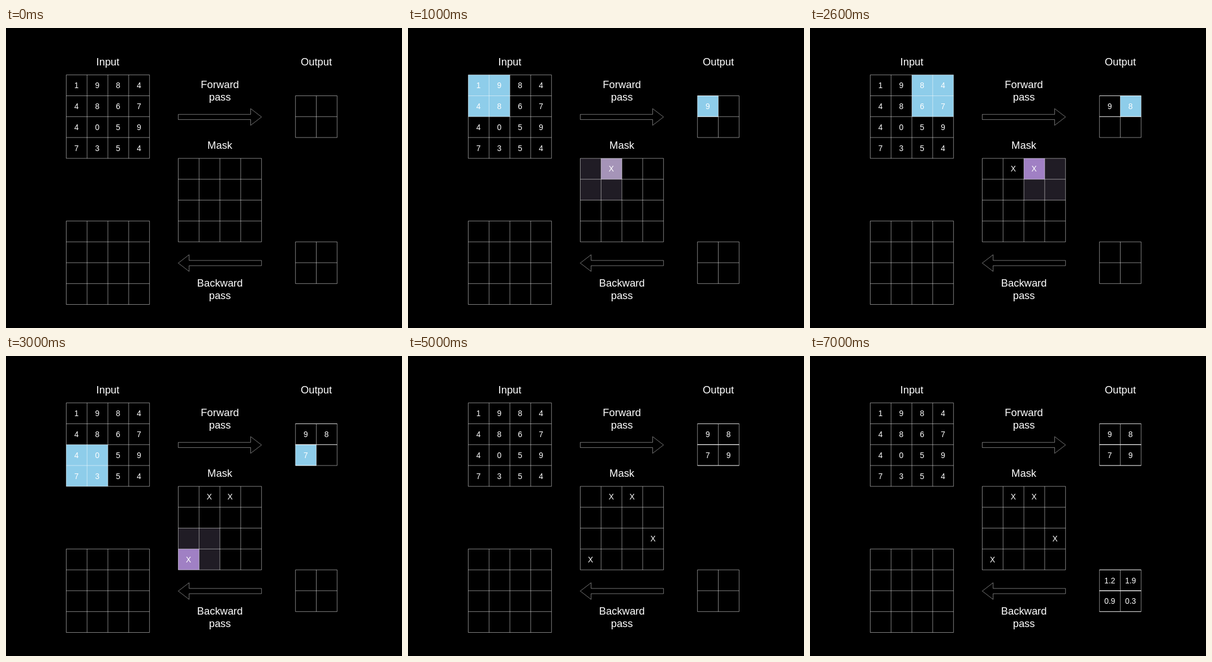
Animation, 700 px wide and 529 px high, one loop 8 s. Source, as an HTML page:

```html
<!DOCTYPE html>
<html lang="en">
<head>
<meta charset="utf-8">
<title>Max pooling: forward and backward pass</title>
<style>
  html, body { margin: 0; width: 100%; height: 100%; overflow: hidden; background: #000; }
  svg { display: block; width: 100%; height: 100%; }
  text { fill: #fff; text-anchor: middle; font-family: "Liberation Sans", Arial, sans-serif; }
  path { fill: none; stroke: #fff; stroke-width: .92; }
  .title { font-size: 18.4px; }
  .value { font-size: 13.8px; }
  .line { stroke-opacity: .56; }
  .edge { stroke-opacity: .8; }
  .arrow { stroke-opacity: .5; }
</style>
</head>
<body>
<svg viewBox="0 0 700 529"></svg>
<script>
const CELL = 36.8;
const LOOP = 8000;
const BLUE = '#8ecdea', DIM = '#201c25';
const svg = document.querySelector('svg');

const input  = { x: 106.5, y: 82.7,  n: 4 };
const mask   = { x: 304.5, y: 229.9, n: 4 };
const output = { x: 511.7, y: 119.5, n: 2 };
const gradIn = { x: 106.5, y: 340.3, n: 4 };
const gradOut = { x: 511.7, y: 377.1, n: 2 };

// One pooling window per step: picked mask cell, its colour and the value passed on.
const pools = [
  { col: 1, row: 0, value: 9, tint: '#a594b8' },
  { col: 2, row: 0, value: 8, tint: '#a080c4' },
  { col: 0, row: 3, value: 7, tint: '#a080c4' },
  { col: 3, row: 2, value: 9, tint: '#a080c4' }
];
const STEP = 1000, GRADIENT_AT = 7000;
const timed = [];

function add(parent, tag, attrs, text) {
  const el = document.createElementNS('http://www.w3.org/2000/svg', tag);
  for (const key in attrs) el.setAttribute(key, attrs[key]);
  if (text !== undefined) el.textContent = text;
  parent.append(el);
  return el;
}

function layer(from, to = LOOP) {
  const el = add(svg, 'g', {});
  timed.push({ el, from, to });
  return el;
}

function fill(parent, grid, col, row, color, span = 1) {
  add(parent, 'rect', {
    x: grid.x + col * CELL, y: grid.y + row * CELL,
    width: span * CELL, height: span * CELL, fill: color
  });
}

// Bright top and bottom edges of a filled-in cell.
function edges(parent, grid, col, row) {
  const x = grid.x + col * CELL, y = grid.y + row * CELL;
  add(parent, 'path', { d: `M${x} ${y}h${CELL}M${x} ${y + CELL}h${CELL}`, class: 'edge' });
}

function value(parent, grid, col, row, text) {
  add(parent, 'text', {
    x: grid.x + (col + .5) * CELL - .3, y: grid.y + (row + .5) * CELL + 5.1, class: 'value'
  }, text);
}

function lines(grid) {
  const { x, y, n } = grid, size = n * CELL;
  let d = '';
  for (let i = 0; i <= n; i++) {
    d += `M${x} ${y + i * CELL}h${size}M${x + i * CELL} ${y}v${size}`;
  }
  add(svg, 'path', { d, class: 'line' });
}

function title(x, y, ...rows) {
  rows.forEach((row, i) => add(svg, 'text', { x, y: y + i * 22.08, class: 'title' }, row));
}

// Arrow drawn from its tail; dir is 1 for right, -1 for left.
function arrow(tail, y, dir) {
  const d = `M${tail} ${y - 4.6}h${dir * 128}v-10.1l${dir * 19.2} 14.7l${-dir * 19.2} 14.7v-10.1h${-dir * 128}z`;
  add(svg, 'path', { d, class: 'arrow' });
}

pools.forEach((p, i) => {
  const start = (i + 1) * STEP, col = i % 2, row = i >> 1;
  const glow = layer(start, start + STEP);
  fill(glow, input, col * 2, row * 2, BLUE, 2);
  fill(glow, mask, col * 2, row * 2, DIM, 2);
  fill(glow, mask, p.col, p.row, p.tint);
  fill(glow, output, col, row, BLUE);
});

[input, mask, output, gradIn, gradOut].forEach(lines);
arrow(304.5, 156.9, 1);
arrow(451.7, 414.5, -1);

title(180, 66.2, 'Input');
title(548.5, 66.2, 'Output');
title(378.1, 106.3, 'Forward', 'pass');
title(378.1, 213.4, 'Mask');
title(378.1, 455.9, 'Backward', 'pass');

['1984', '4867', '4059', '7354'].forEach((digits, row) =>
  [...digits].forEach((digit, col) => value(svg, input, col, row, digit)));

pools.forEach((p, i) => {
  const kept = layer((i + 1) * STEP);
  edges(kept, output, i % 2, i >> 1);
  value(kept, output, i % 2, i >> 1, p.value);
  value(kept, mask, p.col, p.row, 'X');
});

const gradient = layer(GRADIENT_AT);
['1.2', '1.9', '0.9', '0.3'].forEach((text, i) => {
  edges(gradient, gradOut, i % 2, i >> 1);
  value(gradient, gradOut, i % 2, i >> 1, text);
});

const origin = performance.now();
function draw(now) {
  const t = Math.max(0, now - origin) % LOOP;
  for (const { el, from, to } of timed) {
    el.style.display = t >= from && t < to ? '' : 'none';
  }
  requestAnimationFrame(draw);
}
draw(origin);
</script>
</body>
</html>
```
